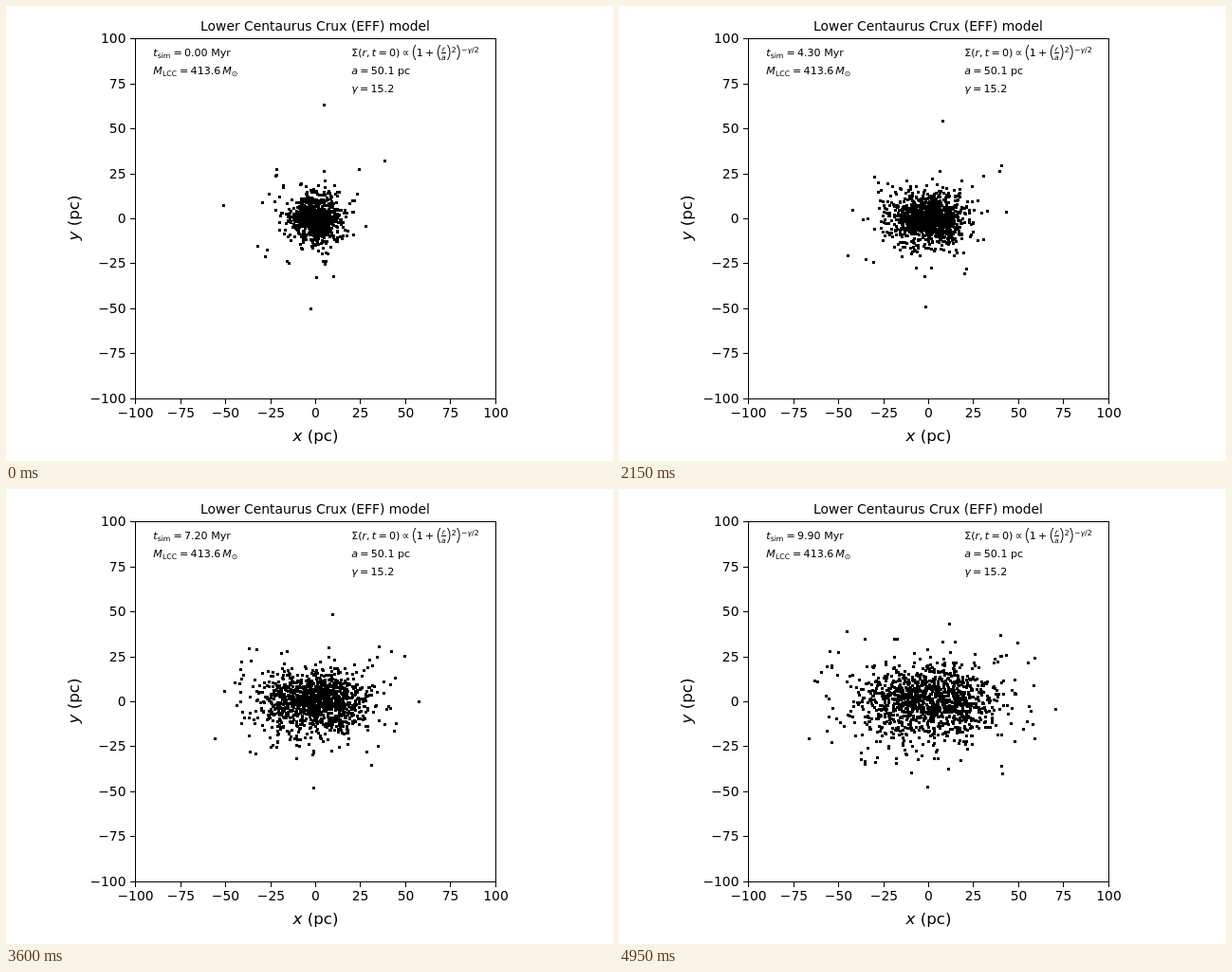
Recreate the animation shown at these times as an HTML page with a canvas. Size 640 by 480 pixels, loop 5000 ms.

```html
<!DOCTYPE html>
<html lang="en">
<head>
<meta charset="utf-8">
<title>Cluster expansion</title>
<style>
html, body { margin: 0; width: 100%; height: 100%; overflow: hidden; background: #fff; }
canvas { display: block; }
</style>
</head>
<body>
<canvas id="stage" width="640" height="480"></canvas>
<script>
const ctx = document.getElementById('stage').getContext('2d');
const STEP = 50, STEPS = 100, SPAN = 9.9, COUNT = 1250;
const px = x => 326 + 1.8975 * x;
const py = y => 224 - 1.8975 * y;

let seed = 20231;
function random() {
  seed = (seed + 0x6D2B79F5) | 0;
  let t = Math.imul(seed ^ (seed >>> 15), 1 | seed);
  t = (t + Math.imul(t ^ (t >>> 7), 61 | t)) ^ t;
  return ((t ^ (t >>> 14)) >>> 0) / 4294967296;
}
const spread = a => (random() * 2 - 1) * a;
const gauss = s => s * Math.sqrt(-2 * Math.log(1 - random())) * Math.cos(2 * Math.PI * random());

// Outermost stars; positions in parsecs, velocities in parsecs per Myr
const stars = [
  { x: 5, y: 63, vx: .64, vy: -2.02 },
  { x: -2.5, y: -50, vx: .2, vy: .25 },
  { x: 21.7, y: 9.8, vx: 4.95, vy: -1.39 },
  { x: -28, y: -21, vx: -3.88, vy: .05 },
  { x: -51, y: 7.5, vx: 2.02, vy: -.66 },
  { x: 38.5, y: 32, vx: .5, vy: -.6 }
];

// Steep radial profile, uniform angle, faster spread along x; some stars are loosely bound
while (stars.length < COUNT) {
  const loose = random() < .12 ? 2 : 1;
  const tail = Math.sqrt(14 * (Math.pow(1 - random(), -1 / 7) - 1));
  const r = 7.3 * loose * Math.abs(tail * Math.cos(2 * Math.PI * random()));
  const angle = 2 * Math.PI * random();
  const star = {
    x: r * Math.cos(angle),
    y: r * Math.sin(angle),
    vx: loose * (spread(2.7) + spread(1.4)),
    vy: loose * gauss(.85)
  };
  const endX = star.x + star.vx * SPAN, endY = star.y + star.vy * SPAN;
  if (r < 40 && Math.abs(endX) < 66 && Math.abs(endY) < 40) stars.push(star);
}

function text(str, x, y, size, align = 'left', italic = false) {
  ctx.font = `${italic ? 'italic ' : ''}${size}px "DejaVu Sans", sans-serif`;
  ctx.textAlign = align;
  ctx.fillText(str, x, y);
  return ctx.measureText(str).width;
}

// Tall thin bracket; dir is 1 for opening, -1 for closing
function bracket(x, y, dir) {
  const edge = x + 2.6 + 1.6 * dir;
  ctx.beginPath();
  ctx.moveTo(edge, y - 12);
  ctx.quadraticCurveTo(edge - 5 * dir, y - 4, edge, y + 4);
  ctx.stroke();
  return 5.2;
}

// Runs are [string, style, shift]; a number is a gap. i: italic, s: small, p: tall bracket
function formula(x, y, runs) {
  for (const run of runs) {
    if (typeof run === 'number') { x += run; continue; }
    const [str, style = '', shift = 0] = run;
    if (style === 'p') x += bracket(x, y, str === '(' ? 1 : -1);
    else x += text(str, x, y + shift, style.includes('s') ? 7.78 : 11.11, 'left', style.includes('i'));
  }
}
const equals = [2.2, ['='], 2.2];

function axisLabel(name, x, y, turn) {
  ctx.save();
  ctx.translate(x, y);
  ctx.rotate(turn);
  const w = text(name, -23.5, 0, 16.67, 'left', true);
  text(' (pc)', w - 23.5, 0, 16.67);
  ctx.restore();
}

function axes() {
  ctx.strokeRect(136.5, 34.5, 380, 380);
  for (let v = -100; v <= 100; v += 25) {
    const x = Math.round(px(v)), y = Math.round(py(v));
    const label = String(v).replace('-', '\u2212');
    ctx.fillRect(x, 415, 1, 5);
    ctx.fillRect(131, y, 5, 1);
    text(label, x + .5, 434, 13.89, 'center');
    text(label, 126.5, y + 5, 13.89, 'right');
  }
  text('Lower Centaurus Crux (EFF) model', 326, 26, 13.89, 'center');
  axisLabel('x', 326, 459, 0);
  axisLabel('y', 77, 224, -Math.PI / 2);
}

function notes(time) {
  formula(155.3, 53, [['t', 'i'], ['sim', 's', 2], .8, ...equals, [time.toFixed(2) + ' Myr']]);
  formula(155.3, 72, [['M', 'i'], ['LCC', 's', 2], .8, ...equals, ['413.6'], 1.8, ['M', 'i'], ['\u2299', 's', 2]]);
  formula(364.2, 53, [
    ['Σ('], ['r', 'i'], [','], 2.2, ['t', 'i'], ...equals, ['0)'], 2.2, ['∝'], 2.2,
    ['(', 'p'], ['1'], 2.2, ['+'], 2.2, ['(', 'p'], 1, ['r', 'is', -5], -4, ['a', 'is', 4], .8,
    [')', 'p'], ['2', 's', -4], [')', 'p'], ['\u2212', 's', -4], ['γ', 'is', -4], ['/2', 's', -4]
  ]);
  ctx.fillRect(459, 49, 5, 1);
  formula(364.2, 72, [['a', 'i'], ...equals, ['50.1 pc']]);
  formula(364.2, 91, [['γ', 'i'], ...equals, ['15.2']]);
}

function draw(now) {
  const time = Math.floor(now / STEP) % STEPS / 10;
  ctx.fillStyle = '#fff';
  ctx.fillRect(0, 0, 640, 480);
  ctx.fillStyle = '#000';
  for (const { x, y, vx, vy } of stars) {
    ctx.fillRect(Math.round(px(x + vx * time)) - 1, Math.round(py(y + vy * time)) - 1, 3, 3);
  }
  axes();
  notes(time);
}

const start = performance.now();
function tick() {
  draw(performance.now() - start);
  requestAnimationFrame(tick);
}
tick();
</script>
</body>
</html>
```
